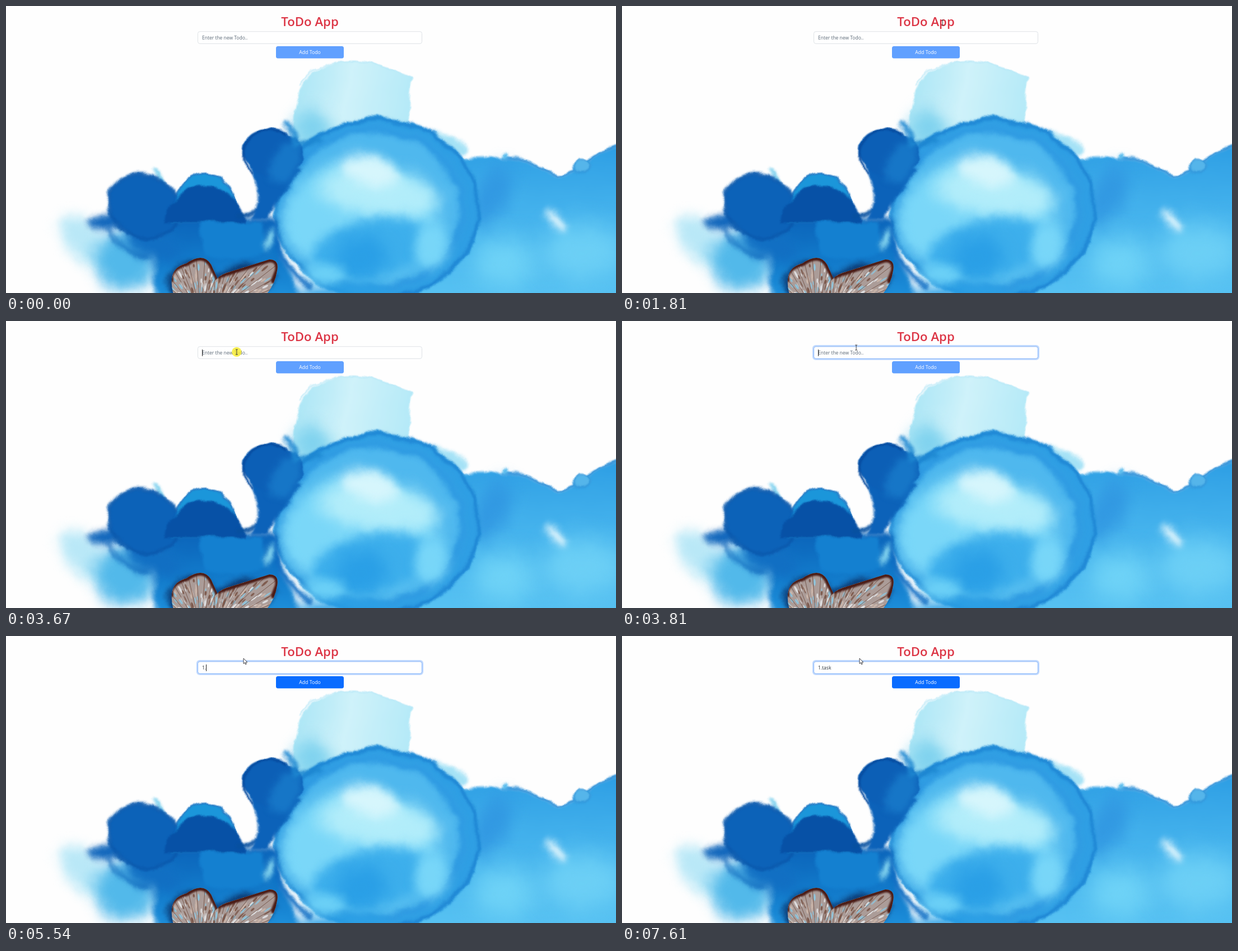
Animation of 1089 by 514 pixels, one loop 8 s. Source, as an HTML page:

```html
<!DOCTYPE html>
<html lang="en">
<head>
<meta charset="utf-8">
<title>ToDo App</title>
<style>
  html, body { margin: 0; width: 100%; height: 100%; overflow: hidden; background: #fefefe; }
  svg { position: absolute; left: 0; top: 0; width: 1089px; height: 514px; }
  #art { will-change: transform; }
  text { font-family: "Open Sans", "Noto Sans", sans-serif; font-size: 8.5px; white-space: pre; }
</style>
</head>
<body>
<svg id="art" viewBox="0 0 1089 514">
  <defs>
    <filter id="bleed" color-interpolation-filters="sRGB">
      <feTurbulence type="fractalNoise" baseFrequency=".025" numOctaves="4" seed="4"/>
      <feDisplacementMap in="SourceGraphic" scale="14" xChannelSelector="R" yChannelSelector="G"/>
    </filter>
    <linearGradient id="veil" x2="1" y2=".2">
      <stop stop-color="#a6e4f5"/>
      <stop offset=".5" stop-color="#cff2fa"/>
      <stop offset="1" stop-color="#b5eaf8"/>
    </linearGradient>
    <linearGradient id="sea" x2="0" y2="1">
      <stop stop-color="#2d9ee4"/>
      <stop offset=".4" stop-color="#45b3ed"/>
      <stop offset="1" stop-color="#5cc6f4"/>
    </linearGradient>
    <linearGradient id="basin" x2="0" y2="1">
      <stop stop-color="#0b64ba"/>
      <stop offset=".5" stop-color="#127bcb"/>
      <stop offset="1" stop-color="#2196e0"/>
    </linearGradient>
    <clipPath id="leftWing"><path d="M300 520Q285 470 322 461Q352 440 366 463L377 487L370 520Z"/></clipPath>
    <clipPath id="rightWing"><path d="M368 520Q364 485 400 476L470 454Q488 454 484 474Q480 500 462 520Z"/></clipPath>
  </defs>
  <g id="ink" filter="url(#bleed)"></g>
  <g id="leftFan" clip-path="url(#leftWing)"></g>
  <g id="rightFan" clip-path="url(#rightWing)"></g>
</svg>

<svg viewBox="0 0 1089 514">
  <text x="542.5" y="36.4" text-anchor="middle" fill="#dc3545" style="font-size:22.2px;font-weight:600">ToDo App</text>
  <rect id="glow" x="341.2" y="44.5" width="402.6" height="24" rx="4.5" fill="none" stroke="#0d6efd" stroke-opacity=".25" stroke-width="2.8"/>
  <rect x="342.5" y="45.8" width="400" height="21.6" rx="3.5" fill="#fff" stroke="#dee2e6"/>
  <rect id="focus" x="342.5" y="45.8" width="400" height="21.6" rx="3.5" fill="none" stroke="#86b7fe"/>
  <text id="hint" x="350" y="59.8" fill="#5b6876">Enter the new Todo..</text>
  <text id="entry" x="350" y="59.8" fill="#2b333b"></text>
  <rect id="button" x="482" y="72" width="121" height="21.7" rx="3.5"/>
  <text x="542.5" y="86.3" text-anchor="middle" fill="#fff" style="font-size:8.7px">Add Todo</text>
  <circle id="press" cx="411.8" cy="55.4" r="8.6" fill="#f6ec2c" opacity=".82"/>
  <rect id="caret" y="51" width="1" height="12" fill="#222"/>
  <g id="pointer">
    <path id="arrow" d="M0 0V9.6L2.2 7.6L3.7 10.9L5.2 10.2L3.8 7H6.8Z" fill="#fff" stroke="#26262c" stroke-width=".85"/>
    <path id="beam" d="M-2 -4.5H2M0 -4.5V4.5M-2 4.5H2" fill="none" stroke="#333" stroke-width=".9"/>
  </g>
</svg>

<script>
const el = id => document.getElementById(id);
let layer = el('ink');

function put(tag, attrs, soft = 0) {
  const node = document.createElementNS('http://www.w3.org/2000/svg', tag);
  for (const k in attrs) node.setAttribute(k, attrs[k]);
  if (soft) node.style.filter = `blur(${soft}px)`;
  layer.append(node);
}
const oval = (cx, cy, rx, ry, tilt = 0) => ({ cx, cy, rx, ry, transform: `rotate(${tilt} ${cx} ${cy})` });
const wash = (fill, soft, ...place) => put('ellipse', { ...oval(...place), fill }, soft);
const halo = (stroke, width, soft, ...place) =>
  put('ellipse', { ...oval(...place), stroke, fill: 'none', 'stroke-width': width }, soft);
const shape = (d, fill, soft = 1) => put('path', { d, fill }, soft);
const line = (d, stroke, width, soft = 1) =>
  put('path', { d, stroke, fill: 'none', 'stroke-width': width, 'stroke-linecap': 'round' }, soft);
const hill = (x, base, rx, ry) => `M${x - rx} ${base}A${rx} ${ry} 0 0 1 ${x + rx} ${base}`;

function paintSea() {
  const bump = (x, mid, width) => Math.exp(-(((x - mid) / width) ** 2));
  const shore = from => {
    let d = '';
    for (let x = from; x <= 1140; x += 10)
      d += `${d ? 'L' : 'M'}${x} ${272 + 31 * bump(x, 988, 48) - 24 * bump(x, 1100, 45)}`;
    return d;
  };
  shape(shore(760) + 'V560H560Z', 'url(#sea)', 2);
  line(shore(885), '#1c83d2', 3, 1.8);
  wash('#5fbfee', 2, 890, 268, 6, 6);
  wash('#55b5ea', 1.5, 1028, 287, 15, 13);
  halo('#2a90d8', 2.5, 1.5, 1028, 287, 14, 13);
  wash('#3198e2', 14, 868, 340, 25, 60, 25);
  wash('#6ed2f6', 20, 890, 460, 55, 45);
  wash('#6ccff5', 20, 1030, 440, 75, 50);
  wash('#e4f7fd', 7, 982, 385, 25, 9, 50);
}

function paintBloom() {
  const at = (k, dx = 0, dy = 0) => [663 + dx, 363 + dy, 184 * k, 163 * k];
  wash('#a5e2f6', 3, 790, 245, 36, 13, 25);
  wash('#2f9fe4', 1.5, ...at(1));
  halo('#1b80d0', 5, 2.5, ...at(.98));
  wash('#4fb8ee', 8, ...at(.86, -8));
  halo('#2893df', 7, 5, ...at(.87, -8));
  // light gathers above, pigment settles below
  wash('#7ad7f8', 12, 630, 385, 138, 105);
  wash('#b2edfa', 14, 665, 335, 108, 42, 8);
  wash('#d6f6fc', 10, 650, 295, 52, 26, 15);
  wash('#3dafec', 10, 655, 435, 112, 52, -10);
  wash('#2a9fe6', 14, 635, 450, 45, 40);
  wash('#78d6f8', 10, 760, 430, 28, 42);
  wash('#2b9fe5', 10, 600, 512, 90, 14);
  wash('#6ed2f7', 9, 570, 480, 36, 15);
}

function paintLeft() {
  wash('#b9e8f7', 11, 145, 425, 62, 32, 45);
  wash('#52b9ea', 13, 215, 455, 55, 55, 25);
  wash('#8dd6f0', 2, 275, 307, 5, 18, -30);
  shape('M290 380H485L495 450L535 540H270Q250 450 290 380', 'url(#basin)', 5);
  wash('#116fc3', 9, 262, 425, 55, 28, 20);
  shape('M345 387H459V440Q410 465 355 445Z', '#1480d0', 2);
  wash('#1267bc', 6, 185, 385, 40, 13, -10);
  wash('#0c62b8', 2.5, 246, 360, 66, 58, 25);
  halo('#0956aa', 4, 2, 246, 360, 64, 56, 25);
  line('M184 398Q200 440 255 450', '#0d65ba', 6, 4);

  const back = hill(355, 388, 63, 89);
  shape(back, '#1b96da');
  line(back, '#0a68bd', 2.4);
  shape(hill(355, 388, 72, 65), '#0751a6', 1.5);
  line('M415 376Q445 380 454 352', '#07509f', 6, 2);
}

function paintPlume() {
  shape('M432 285Q462 335 438 383H468Q485 340 530 290Z', '#0c62b9', 2);
  wash('#0c5fb6', 1, 476, 262, 55, 43, 10);
  wash('#1676c7', 6, 500, 280, 24, 40, 25);
  line('M440 302Q406 270 440 230Q465 213 503 228', '#064b9f', 4, 1.5);
  line('M500 213Q515 215 518 250Q540 245 560 240', '#1d86d0', 8, 3);
  line('M479 396Q485 470 545 500', '#0d6bc2', 8, 3);
  wash('#8cdcf3', 4, 470, 418, 6, 20, 20);
}

function random(seed) {
  return () => (seed = seed * 16807 % 2147483647) / 2147483647;
}

// Ribs and mottling fan out from the root of a wing.
function paintWing(fan, edge, x, y, from, to) {
  const rnd = random(x);
  const polar = (angle, r) => [x + r * Math.cos(angle), y + r * Math.sin(angle)];
  layer = el(fan);
  put('rect', { x: 280, y: 440, width: 220, height: 80, fill: '#ab9c98' });
  for (let i = 0; i < 130; i++) {
    const angle = from + (to - from) * rnd();
    const [cx, cy] = polar(angle, 30 + 95 * rnd());
    const fill = ['#dfe0e2', '#8fc3da', '#7d5a4d', '#c9b4a9'][Math.floor(rnd() * 4)];
    wash(fill, .6, cx, cy, 3 + 5 * rnd(), 1 + rnd(), angle * 180 / Math.PI);
  }
  for (let i = 0; i <= 10; i++)
    line(`M${x} ${y}L${polar(from + (to - from) * i / 10, 140)}`, '#745448', .9, .4);
  line(edge, '#4a1b15', 10, 1.5);
}

function paintArt() {
  shape('M512 215Q516 98 622 98Q690 104 726 132Q712 175 726 250L600 300L512 270Z', 'url(#veil)');
  wash('#7fd2ee', 14, 545, 220, 30, 35);
  line('M525 145Q550 98 622 98Q690 104 726 132', '#a3e1f5', 1.6, .8);
  paintSea();
  paintBloom();
  paintLeft();
  paintPlume();
  wash('#0c3f7a', 5, 335, 495, 48, 38);
  wash('#0c3f7a', 5, 420, 495, 62, 32, -15);
  paintWing('leftFan', 'M294 490Q290 470 322 461Q352 440 366 463L378 487', 348, 555, -2.4, -.9);
  paintWing('rightFan', 'M380 483L470 454Q488 454 485 474L478 492', 372, 550, -1.7, -.4);
}

// Pointer stops: time, x, y
const stops = [
  [490, 1014, 503], [1050, 424, 25.5], [1180, 424, 25.5], [2080, 613, 31], [2640, 451, 61.3],
  [2930, 408, 68], [3130, 408, 57], [3740, 412, 55.5], [3880, 424, 40]
];
const LOOP = 8000, BLINK = 530, FOCUS = 3670;
const WORD = '1.task', keys = [4880, 5540, 6140, 6410, 6480, 7080];

const clamp = v => Math.max(0, Math.min(1, v));
const ease = v => v * v * (3 - 2 * v);
const show = (id, on) => el(id).setAttribute('visibility', on ? 'visible' : 'hidden');

function pointAt(t) {
  let [, x, y] = stops[0];
  for (let i = 1; i < stops.length; i++) {
    const [a, b] = [stops[i - 1], stops[i]];
    const k = ease(clamp((t - a[0]) / (b[0] - a[0])));
    x += (b[1] - a[1]) * k;
    y += (b[2] - a[2]) * k;
  }
  return [x, y];
}

function render(t) {
  const [x, y] = pointAt(t);
  const inside = (l, top, r, b) => x > l && x < r && y > top && y < b;
  const overText = inside(342, 46, 743, 67) || inside(491, 17, 594, 43);
  el('pointer').setAttribute('transform', `translate(${x} ${y})`);
  show('arrow', t >= 490 && !overText);
  show('beam', t >= 490 && overText);
  show('press', t >= 3530 && t < 3810);

  const focus = ease(clamp((t - FOCUS) / 150));
  el('glow').style.opacity = el('focus').style.opacity = focus;

  const typed = keys.filter(k => t >= k);
  const word = WORD.slice(0, typed.length);
  const entry = el('entry');
  if (entry.textContent !== word) entry.textContent = word;
  show('hint', !word);
  el('button').setAttribute('fill', word ? '#0a6cff' : '#60a0ff');

  // every key press restarts the blink
  const since = t - (typed.pop() || FOCUS);
  el('caret').setAttribute('x', Math.round(349.8 + (word ? entry.getComputedTextLength() : 0)));
  show('caret', since >= 0 && since % (2 * BLINK) < BLINK);
}

paintArt();
const start = performance.now();
(function loop() {
  render((performance.now() - start) % LOOP);
  requestAnimationFrame(loop);
})();
</script>
</body>
</html>
```
